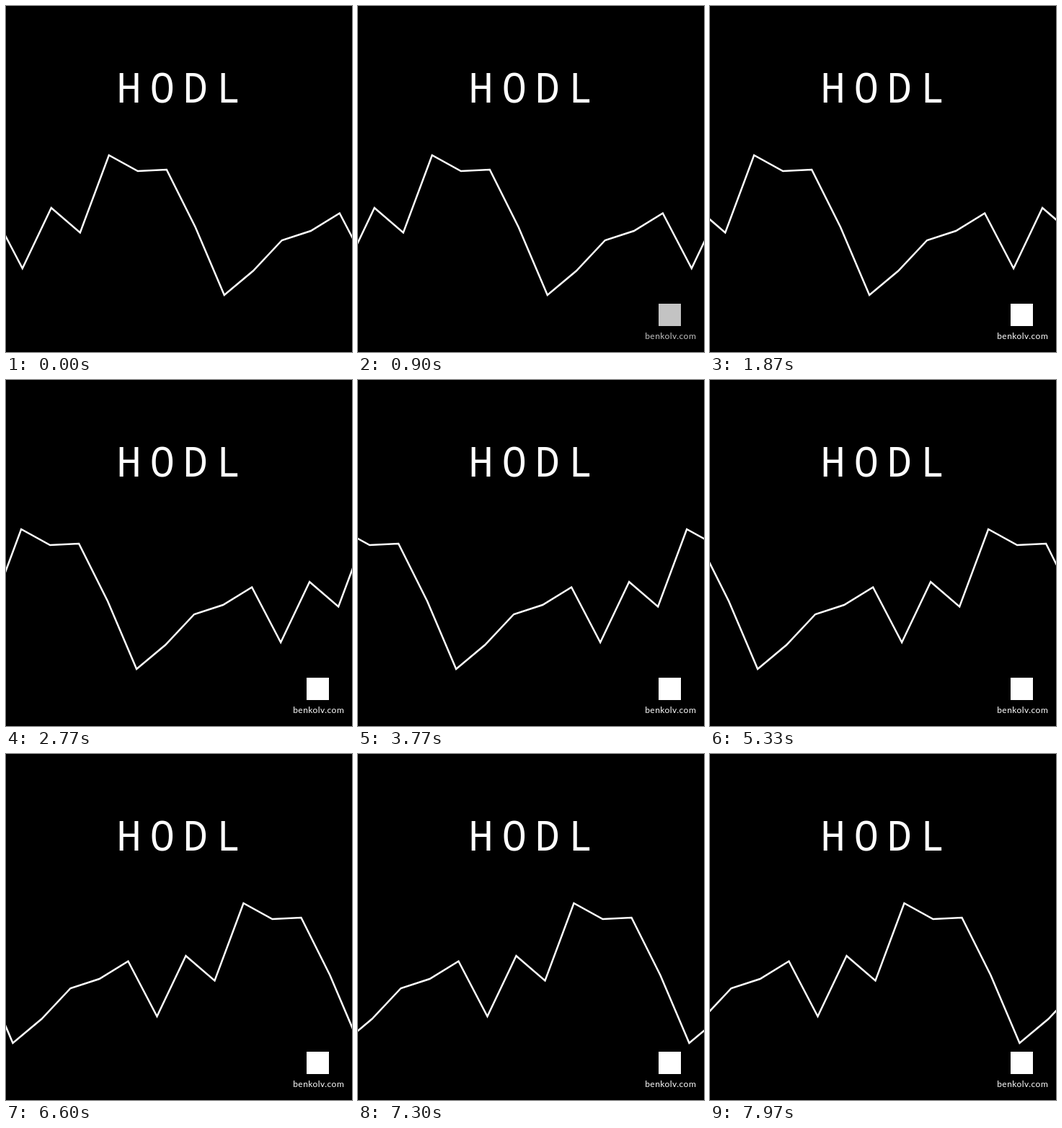
Animation of 480 by 480 pixels, one loop 8 s. Source, as an HTML page:

```html
<!DOCTYPE html>
<html lang="en">
<head>
<meta charset="utf-8">
<title>HODL</title>
<style>
  html, body { margin: 0; width: 100%; height: 100%; overflow: hidden; background: #000; }
  svg { display: block; width: 100%; height: 100%; }
  text { fill: #fff; }
  .title { font: 400 56px "Noto Sans Mono", monospace; letter-spacing: 12.6px; }
  .site { font: 400 12px Lato, sans-serif; letter-spacing: .45px; text-anchor: middle; }
  .chart { fill: none; stroke: #fff; stroke-width: 2.5; stroke-linejoin: miter; }
</style>
</head>
<body>
<svg viewBox="0 0 480 480">
  <text class="title" x="153.7" y="134">HODL</text>
  <path class="chart" id="chart"/>
  <g id="badge" opacity="0">
    <rect x="417" y="413" width="31" height="31" fill="#fff"/>
    <text class="site" x="433.7" y="461.5">benkolv.com</text>
  </g>
</svg>
<script>
  const LOOP = 8000, FPS = 30, PERIOD = 480, SPACING = 40, START_X = 22.8;
  const STEP = 5 / 3;              // pixels per chart step
  const FADE = [2, 36];            // badge fade, in ticks
  const heights = [364, 280, 314.5, 207, 229, 227, 307, 401, 367.5, 325, 312, 287.5];

  const chart = document.getElementById("chart");
  const badge = document.getElementById("badge");

  const points = Array.from({ length: heights.length * 2 + 4 }, (_, i) => {
    const n = i - 2;
    const y = heights[(n + heights.length) % heights.length];
    return `${START_X + n * SPACING},${y}`;
  });
  chart.setAttribute("d", "M" + points.join("L"));

  function draw(time) {
    const tick = Math.min(LOOP * FPS / 1000 - 1, Math.floor((time % LOOP + 3.4) * FPS / 1000));
    // The chart holds still on one tick out of nine.
    const shift = Math.floor(tick * 8 / 9) * STEP % PERIOD;
    const fade = (tick - FADE[0] + 1) / (FADE[1] - FADE[0]);
    chart.setAttribute("transform", `translate(${-shift.toFixed(3)} 0)`);
    badge.setAttribute("opacity", Math.max(0, Math.min(1, fade)).toFixed(3));
  }

  const begin = performance.now();
  function loop() {
    draw(performance.now() - begin);
    requestAnimationFrame(loop);
  }
  loop();
</script>
</body>
</html>
```
